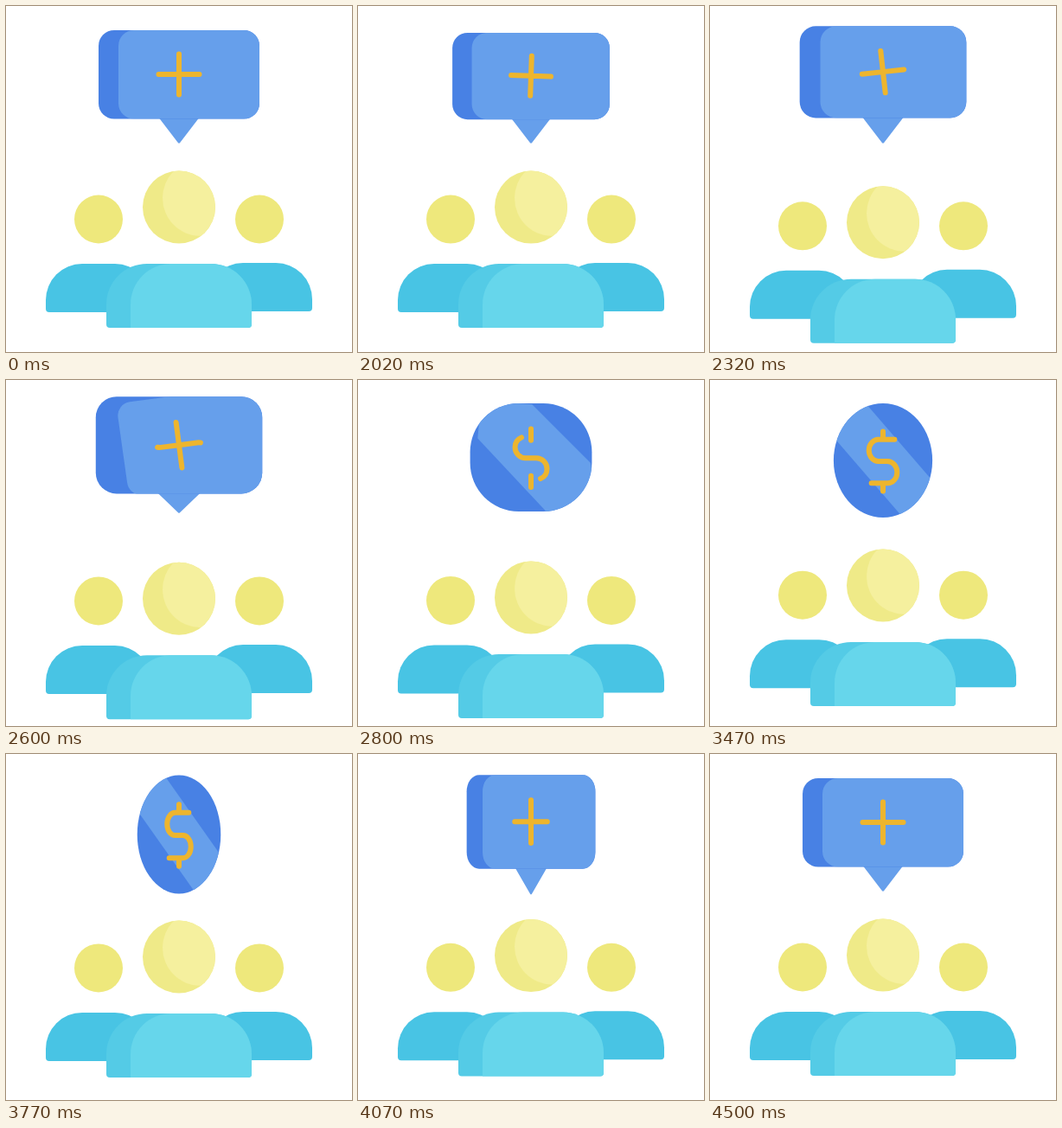
Animation of 400x400 px, one loop 4520 ms. Source, as an HTML page with a canvas:

```html
<!DOCTYPE html>
<html lang="en">
<head>
<meta charset="utf-8">
<title>Team funding</title>
<style>
html, body { margin: 0; width: 100%; height: 100%; overflow: hidden; background: #fff; }
canvas { display: block; width: 400px; height: 400px; }
</style>
</head>
<body>
<canvas id="stage" width="400" height="400"></canvas>
<script>
const ctx = document.getElementById('stage').getContext('2d');
const LOOP = 4520;
const BLUE = '#669feb', DARK_BLUE = '#4881e4', GOLD = '#edb52e';
const COIN_Y = 93.5;

const lerp = (a, b, k) => a + (b - a) * k;
const clamp = k => Math.max(0, Math.min(1, k));
const span = (t, from, to) => clamp((t - from) / (to - from));

// Cubic timing curve with horizontal handles at x1 and x2.
function ease(x, x1, x2) {
  if (x <= 0 || x >= 1) return clamp(x);
  let lo = 0, hi = 1, s = 0.5;
  for (let i = 0; i < 24; i++) {
    s = (lo + hi) / 2;
    const u = 1 - s;
    if (3 * u * u * s * x1 + 3 * u * s * s * x2 + s * s * s < x) lo = s; else hi = s;
  }
  return s * s * (3 - 2 * s);
}

function disc(x, y, r, color) {
  ctx.fillStyle = color;
  ctx.beginPath();
  ctx.arc(x, y, r, 0, Math.PI * 2);
  ctx.fill();
}

function torso(left, right, top, bottom, r, color, footLeft = 4) {
  ctx.fillStyle = color;
  ctx.beginPath();
  ctx.roundRect(left, top, right - left, bottom - top, [r, r, 4, footLeft]);
  ctx.fill();
}

function drawPeople(t) {
  const shift = t < 2500
    ? ease(span(t, 2000, 2500), 0.37, 0.32)
    : 1 - ease(span(t, 2520, 4500), 0.37, 0.2);
  const side = shift * 9, front = shift * 20.3;

  torso(46, 168, 298 + side, 354 + side, 42, '#48c4e4');
  torso(232, 354, 297 + side, 353 + side, 42, '#48c4e4');
  disc(107, 246.5 + side, 28, '#eee87c');
  disc(293, 246.5 + side, 28, '#eee87c');

  torso(116, 284, 298 + front, 372 + front, 47, '#54cbe6');
  torso(144, 284, 298 + front, 372 + front, 47, '#66d6eb', 0);

  const y = 232.5 + front;
  disc(200, y, 42, '#efea88');
  ctx.save();
  ctx.beginPath();
  ctx.arc(200, y, 42, 0, Math.PI * 2);
  ctx.clip();
  disc(225, y - 10.5, 44, '#f5f09e');
  ctx.restore();
}

function signState(t) {
  const state = { morph: 0, trim: 0, scale: 1, tilt: 0, sx: 1, sy: 1 };
  if (t < 2000) return state;
  if (t < 2130) {
    const k = Math.sin(span(t, 2000, 2130) * Math.PI / 2);
    state.scale = 1 - 0.09 * k;
    state.tilt = 8 * k;
    return state;
  }
  const turn = 540 * ease(span(t, 3150, 4500), 0.33, 0.2);
  if (turn < 450) {
    const k = ease(span(t, 2130, 2500), 0.33, 0.3);
    state.scale = lerp(0.91, 1.076, k);
    state.tilt = lerp(8, -11, k) * (1 - ease(span(t, 2520, 2760), 0.33, 0.5));
    state.morph = ease(span(t, 2520, 3010), 0.33, 0.3);
    state.trim = ease(span(t, 2600, 3080), 0.33, 0.67);
  }
  const a = turn * Math.PI / 180;
  state.sx = Math.abs(Math.cos(a));
  state.sy = 1 + 0.16 * Math.sin(a) ** 2;
  return state;
}

function drawPanel({ morph, scale }) {
  const px = x => 200 + (x - 200) * scale;
  const py = y => 159 + (y - 159) * scale;
  const left = lerp(px(107), 136, morph), right = lerp(px(293), 264, morph);
  const top = lerp(py(28), 29, morph), bottom = lerp(py(130.5), 157, morph);
  const radius = lerp(18 * scale, 64, morph);

  const tail = 1 - 2.5 * morph;
  if (tail > 0) {
    ctx.fillStyle = BLUE;
    ctx.beginPath();
    ctx.moveTo(px(177), bottom - 1);
    ctx.lineTo(px(223), bottom - 1);
    ctx.arcTo(200, bottom + 29 * scale * tail, px(177), bottom - 1, 1.5);
    ctx.closePath();
    ctx.fill();
  }

  const base = new Path2D();
  base.roundRect(left, top, right - left, bottom - top, radius);
  ctx.fillStyle = DARK_BLUE;
  ctx.fill(base);

  // The light face turns into a diagonal stripe.
  const quick = 1 - (1 - morph) ** 1.75;
  const mix = (x0, y0, x1, y1, k) => [lerp(px(x0), x1, k), lerp(py(y0), y1, k)];
  const outerTop = mix(200, 28, 130, 25, morph);
  const a = mix(130, 28, 139, 70, quick);
  const b = mix(130, 130.5, 222, 153, quick);
  const outerBottom = mix(300, 130.5, 275, 170, morph);
  const c = mix(293, 24, 262, 113.5, morph);
  const d = mix(293, 24, 180, 31.5, morph);
  const corner = 18 * scale * (1 - quick);

  ctx.save();
  ctx.clip(base);
  ctx.fillStyle = BLUE;
  ctx.beginPath();
  ctx.moveTo(...outerTop);
  ctx.arcTo(...a, ...b, corner);
  ctx.arcTo(...b, ...outerBottom, corner);
  ctx.lineTo(...outerBottom);
  ctx.lineTo(...c);
  ctx.lineTo(...d);
  ctx.closePath();
  ctx.fill();
  ctx.restore();
}

function halfSymbol(morph, trim) {
  const inner = 24.5 * morph, outer = lerp(23.5, 33.5, clamp(morph * 1.2));
  ctx.moveTo(0, -inner);
  ctx.lineTo(0, -outer);

  const flat = lerp(23.5, 6, clamp(morph * 2));
  const r = 12.25, arc = Math.PI * r;
  const rest = lerp(23.5, 6 + arc + 15 + 6, trim) - flat;
  ctx.moveTo(0, 0);
  ctx.lineTo(-flat, 0);
  if (rest > 0) {
    const angle = Math.min(rest, arc) / r;
    ctx.arc(-flat, -r, r, Math.PI / 2, Math.PI / 2 + angle);
    if (rest > arc) ctx.lineTo(-flat + rest - arc, -2 * r);
  }
}

function drawSymbol({ morph, trim, scale, tilt }) {
  const size = lerp(scale, 1, morph);
  ctx.translate(200, lerp(159 - 80 * scale, 94, morph));
  ctx.rotate(tilt * Math.PI / 180);
  ctx.scale(size, size);
  ctx.beginPath();
  halfSymbol(morph, trim);
  ctx.rotate(Math.PI);
  halfSymbol(morph, trim);
}

function drawSign(t) {
  const state = signState(t);
  ctx.save();
  ctx.translate(200, COIN_Y);
  ctx.scale(Math.max(state.sx, 0.005), state.sy);
  ctx.translate(-200, -COIN_Y);
  drawPanel(state);
  drawSymbol(state);
  ctx.restore();
  // Stroked outside the transform so the line keeps its weight.
  ctx.strokeStyle = GOLD;
  ctx.lineWidth = 6 * Math.min(1, state.sx * 3);
  ctx.lineCap = ctx.lineJoin = 'round';
  ctx.stroke();
}

function render(now) {
  const t = now % LOOP;
  ctx.fillStyle = '#fff';
  ctx.fillRect(0, 0, 400, 400);
  drawPeople(t);
  drawSign(t);
}

const start = performance.now();
function tick() {
  render(performance.now() - start);
  requestAnimationFrame(tick);
}
tick();
</script>
</body>
</html>
```
